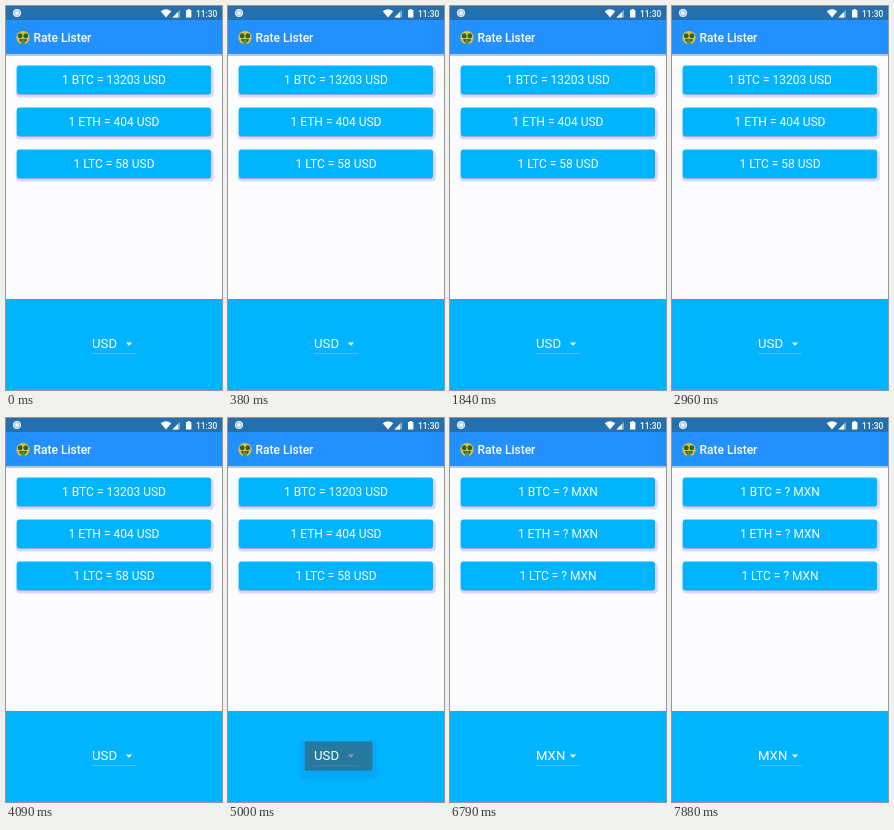
An HTML page for the animation above (8 s loop, 216 by 384 pixels).

```html
<!DOCTYPE html>
<html lang="en">
<head>
<meta charset="utf-8">
<title>Rate Lister</title>
<style>
html, body { margin: 0; width: 100%; height: 100%; overflow: hidden; background: #fcfcff; }
svg { display: block; width: 100%; height: 100%; }
text { font-family: Roboto, sans-serif; fill: #fff; }
.card { font-size: 12px; text-anchor: middle; }
.item { font-size: 13.2px; }
#items text { fill: #fffff0; }
</style>
</head>
<body>
<svg viewBox="0 0 216 384">
  <defs>
    <filter id="soft" x="-30%" y="-30%" width="160%" height="160%"><feGaussianBlur stdDeviation=".7"/></filter>
    <filter id="glow" x="-40%" y="-40%" width="180%" height="180%"><feGaussianBlur stdDeviation="1.3"/></filter>
    <clipPath id="clip"><rect id="hole" x="76.8" width="67.6"/></clipPath>
  </defs>
  <rect width="216" height="384" fill="#fcfcff"/>
  <rect y="46" width="216" height="4" fill="#8f95b8" opacity=".55" filter="url(#soft)"/>
  <rect y="14" width="216" height="34" fill="#2390ff"/>
  <rect width="216" height="14" fill="#246fae"/>

  <circle cx="11" cy="7" r="3.7" fill="#a9cbe4" stroke="#e6f2fa"/>
  <circle cx="11" cy="7" r="1.7" fill="#fff"/>
  <g fill="#fff">
    <path d="M160 11.6 154.7 5.2Q160 1.2 165.3 5.2Z"/>
    <path d="M166.5 11.5H174V3.8Z" opacity=".45"/>
    <path d="M166.5 11.5H172V6Z"/>
    <path d="M180 4H181.6V3H183.8V4H185.4V11.6H180Z"/>
  </g>
  <text x="190" y="10.8" font-size="8.4" font-weight="500">11:30</text>

  <g transform="translate(17 31.5)">
    <circle r="6.6" fill="#e3bd3c"/>
    <ellipse cx="-2.8" cy="-1.7" rx="2.4" ry="2.5" fill="#1d6a2b"/>
    <ellipse cx="2.8" cy="-1.7" rx="2.4" ry="2.5" fill="#1d6a2b"/>
    <path d="M-4 1.7H4Q3 5 0 5T-4 1.7Z" fill="#4a3a1a"/>
    <path d="M-1.9 2.2H1.9V6.4H-1.9Z" fill="#3f9a45"/>
  </g>
  <text x="27.5" y="35.8" font-size="12" font-weight="500">Rate Lister</text>

  <g id="cards"></g>
  <rect y="293" width="216" height="91" fill="#00b4ff"/>
  <text id="chosen" class="item" x="86" y="342.2"></text>
  <path d="M119.8 336.6H126.2L123 339.7Z" fill="#fff"/>
  <path d="M86 347.5H130" stroke="#5ccbff" stroke-width=".8"/>

  <g id="menu">
    <rect id="shade" x="72" width="77.5" rx="5" fill="#3048c0" opacity=".22" filter="url(#glow)"/>
    <rect id="panel" x="76.8" width="67.6" rx="1.2" fill="#484850"/>
    <g clip-path="url(#clip)">
      <rect id="press" x="76.8" y="92.8" width="67.6" height="28.8" fill="#fff"/>
      <g id="items"></g>
    </g>
  </g>
</svg>
<script>
const LOOP = 8000, OPEN = 4960, PRESS = 6330, CLOSE = 6440;
const PITCH = 28.8, FIRST = 9, TOTAL = 21;
const codes = "INR JPY MXN NOK NZD PLN RON RUB SEK SGD USD".split(" ");
const prices = { BTC: 13203, ETH: 404, LTC: 58 };

const $ = id => document.getElementById(id);
const ramp = (v, a, b) => Math.min(1, Math.max(0, (v - a) / (b - a)));
const mix = (a, b, k) => a + (b - a) * k;

function add(parent, tag, attrs) {
  const el = document.createElementNS("http://www.w3.org/2000/svg", tag);
  for (const k in attrs) el.setAttribute(k, attrs[k]);
  return parent.appendChild(el);
}

const labels = Object.keys(prices).map((coin, i) => {
  const y = 59.5 + 42 * i, cards = $("cards");
  add(cards, "rect", { x: 9.8, y: y + 1.5, width: 198, height: 30.5, rx: 4, fill: "#d8d9f6", filter: "url(#soft)" });
  add(cards, "rect", { x: 11, y: y + 1, width: 194, height: 28.5, rx: 3, fill: "#93acd8" });
  add(cards, "rect", { x: 10.8, y, width: 194.2, height: 28.5, rx: 2.5, fill: "#00b4ff" });
  return [coin, add(cards, "text", { class: "card", x: 108, y: y + 18.7 })];
});

const items = codes.map((code, i) => {
  const el = add($("items"), "text", { class: "item", x: 86, y: 54.2 + PITCH * i });
  el.textContent = code;
  return el;
});

function span(el, y, h) {
  el.setAttribute("y", y);
  el.setAttribute("height", h);
}

function draw(t) {
  const picked = t >= CLOSE;
  const code = picked ? "MXN" : "USD";
  $("chosen").textContent = code;
  for (const [coin, el] of labels)
    el.textContent = `1 ${coin} = ${picked ? "?" : prices[coin]} ${code}`;

  // Fade in, grow out of the selected row, then reveal the rows in turn
  const v = ramp(t, OPEN, OPEN + 300);
  const fade = ramp(v, 0, 0.25) * (1 - ramp(t, CLOSE, CLOSE + 75));
  $("menu").setAttribute("opacity", fade);
  const grow = ramp(v, 0.25, 0.5);
  const top = mix(323.6, 28.8, grow), bottom = mix(352.4, 355.2, grow);
  span($("panel"), top, bottom - top);
  span($("hole"), top, bottom - top);
  span($("shade"), top, bottom - top + 8);

  const unit = 0.5 / (TOTAL + 1.5);
  items.forEach((el, i) => {
    const start = 0.5 + (FIRST + i + 1) * unit;
    el.setAttribute("opacity", codes[i] === "USD" ? 1 : ramp(v, start, start + 1.5 * unit));
  });
  $("press").setAttribute("opacity", 0.12 * ramp(t, PRESS, PRESS + 80));
}

function tick() {
  draw(performance.now() % LOOP);
  requestAnimationFrame(tick);
}
tick();
</script>
</body>
</html>
```
